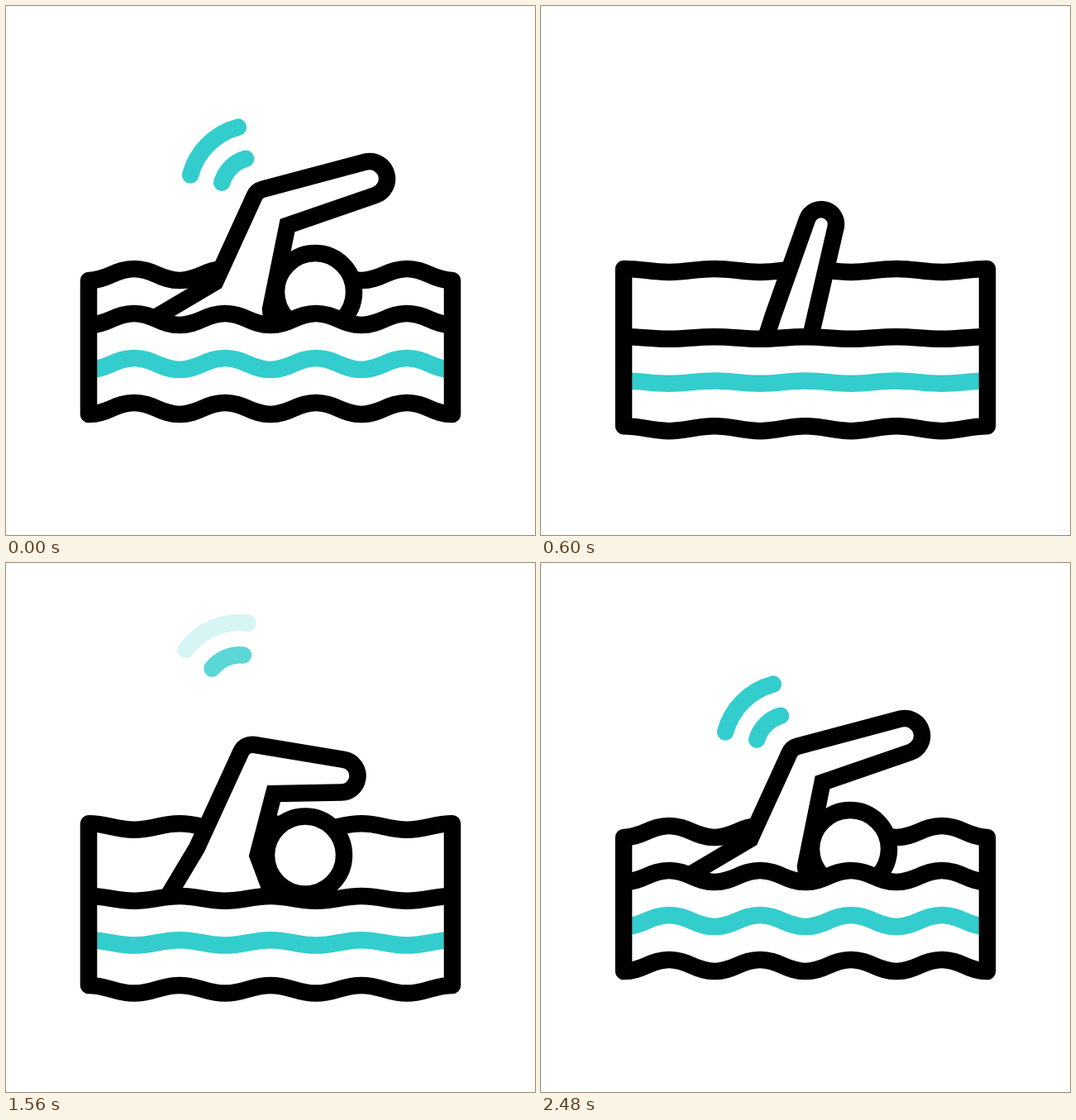
These frames come from a looping animation (640x640 px, 2.64 s). An HTML page with a canvas:

```html
<!DOCTYPE html>
<html lang="en">
<head>
<meta charset="utf-8">
<title>Swimmer</title>
<style>
  html, body { margin: 0; width: 100%; height: 100%; overflow: hidden; background: #fff; }
  canvas { display: block; width: 640px; height: 640px; }
</style>
</head>
<body>
<canvas id="stage" width="640" height="640"></canvas>
<script>
const ctx = document.getElementById('stage').getContext('2d');
const LOOP = 2640, STEP = 40, LAST = 2480, HALF = 1120;
const TEAL = '#33cdcd', INK = '#000', PAPER = '#fff';
const LEFT = 100, RIGHT = 540, CREST = 55, HANDLE = 23, LINE = 20.5;

// Each pose: foot, hip, elbow, hand (x, y, radius), armpit, waist, belly, head
const REST = [150,395, 253,334, 303.5,223.6, 440,209,21, 340.5,265.5, 320,367, 324,400, 374,346];
const UP = [136,398, 252.5,309, 285,208, 366,118.5,18, 331,228, 321.5,333, 336,403, 376,311];
const DIVE = [150,394, 250,304, 281,208, 339,98,18, 327,230, 318,334, 325,384, 372,312];
const REACH = [190,413, 231,344.5, 289,218, 405.5,257.5,20, 324,279, 304.5,354, 327,414, 362,353.5];
const PULL = [160,409, 240,313, 297,195.5, 421,218,20, 330,249, 310.5,333, 328,406, 364,325.5];

// The hand radius at index 8 shifts the x, y order of the values after it
const isY = i => i < 8 ? i % 2 === 1 : i > 8 && i % 2 === 0;
const blend = (a, b, w, dy) => a.map((v, i) => v + (b[i] - v) * w + (isY(i) ? dy : 0));

const KEYS = [
  [0, REST],
  [240, UP],
  [360, blend(UP, DIVE, 0.35, -10)],
  [560, blend(UP, DIVE, 0.9, 101)],
  [600, blend(UP, DIVE, 1, 166)],
  [800, blend(UP, DIVE, 1, 500)],
  [1300, blend(REACH, REACH, 0, 240)],
  [1560, REACH],
  [2040, PULL],
  [LAST, REST]
];

const clamp = x => Math.min(1, Math.max(0, x));
const smooth = x => { x = clamp(x); return x * x * (3 - 2 * x); };
const ramp = (t, from, to) => clamp((t - from) / (to - from));

function slope(k, i) {
  return (KEYS[k + 1][1][i] - KEYS[k][1][i]) / (KEYS[k + 1][0] - KEYS[k][0]);
}

// Monotone tangent: flat at turning points and at both ends
function tangent(k, i) {
  if (k === 0 || k === KEYS.length - 1) return 0;
  const a = slope(k - 1, i), b = slope(k, i);
  return a * b <= 0 ? 0 : 2 * a * b / (a + b);
}

function poseAt(t) {
  let k = 0;
  while (k < KEYS.length - 2 && t >= KEYS[k + 1][0]) k++;
  const [t0, a] = KEYS[k], [t1, b] = KEYS[k + 1];
  const span = t1 - t0, u = (t - t0) / span, s = smooth(u);
  return a.map((v, i) => v + (b[i] - v) * s
    + span * u * (1 - u) * ((1 - u) * tangent(k, i) - u * tangent(k + 1, i)));
}

// Adds a wave across the pool to the current path
function wave(mid, swing, reverse) {
  const dir = reverse ? -1 : 1;
  let x = reverse ? RIGHT : LEFT, side = 1;
  ctx.lineTo(x, mid + swing);
  for (let n = 0; n < 8; n++) {
    const y0 = mid + swing * side, y1 = mid - swing * side, next = x + dir * CREST;
    ctx.bezierCurveTo(x + dir * HANDLE, y0, next - dir * HANDLE, y1, next, y1);
    x = next;
    side = -side;
  }
}

function strokeWave(color, mid, swing) {
  ctx.beginPath();
  wave(mid, swing);
  ctx.strokeStyle = color;
  ctx.stroke();
}

function paintShape() {
  ctx.fillStyle = PAPER;
  ctx.strokeStyle = INK;
  ctx.fill();
  ctx.stroke();
}

// Angle on the hand circle where the line from (x, y) touches it
function touchAngle(x, y, hx, hy, r, side) {
  return Math.atan2(y - hy, x - hx) + side * Math.acos(r / Math.hypot(x - hx, y - hy));
}

function drawSwimmer(pose) {
  const [fx, fy, cx, cy, ex, ey, hx, hy, r, ax, ay, wx, wy, bx, by, headX, headY] = pose;
  const start = touchAngle(ex, ey, hx, hy, r, 1);
  const end = touchAngle(ax, ay, hx, hy, r, -1);
  ctx.lineJoin = 'miter';
  ctx.beginPath();
  ctx.moveTo(fx, fy);
  ctx.lineTo(cx, cy);
  ctx.arcTo(ex, ey, hx + r * Math.cos(start), hy + r * Math.sin(start), 15);
  ctx.arc(hx, hy, r, start, end);
  ctx.lineTo(ax, ay);
  ctx.lineTo(wx, wy);
  ctx.lineTo(bx, by);
  paintShape();
  ctx.beginPath();
  ctx.arc(headX, headY, 47, 0, Math.PI * 2);
  paintShape();
}

function drawArc(radius, spread, alpha) {
  if (alpha <= 0) return;
  const rad = Math.PI / 180;
  ctx.globalAlpha = alpha;
  ctx.beginPath();
  ctx.arc(0, 0, radius, (225 - spread) * rad, (225 + spread) * rad);
  ctx.stroke();
}

function drawSplash(t, k) {
  const [dx, dy, turn] = t < HALF ? [-68, -76, 89] : [-29, -109, 33];
  const inner = t < HALF ? 1 - ramp(t, 236, 360) : ramp(t, 1480, 1580);
  const outer = t < HALF ? 1 - ramp(t, 80, 246)
    : ramp(t, 1535, 1660) - ramp(t, 1800, 1920) + ramp(t, 2240, 2400);
  ctx.save();
  ctx.translate(302 + dx * k, 225.5 + dy * k);
  ctx.rotate(turn * k * Math.PI / 180);
  ctx.strokeStyle = TEAL;
  ctx.lineCap = 'round';
  drawArc(42.5, 28.7, inner);
  drawArc(81.7, 30, outer);
  ctx.restore();
}

function draw(t) {
  const k = t < HALF ? smooth(t / HALF) : 1 - smooth((t - HALF) / HALF);
  const surface = [379 + 40.7 * k, 7 - 15 * k];

  ctx.fillStyle = PAPER;
  ctx.fillRect(0, 0, 640, 640);
  ctx.lineWidth = LINE;
  strokeWave(TEAL, 433 + 40 * k, 7 - 15.5 * k);

  ctx.lineJoin = 'round';
  ctx.beginPath();
  wave(325 - 9.2 * k, 7 - 16.3 * k);
  wave(487 + 43.7 * k, 7 - 18 * k, true);
  ctx.closePath();
  ctx.strokeStyle = INK;
  ctx.stroke();

  ctx.save();
  ctx.beginPath();
  ctx.moveTo(LEFT, 0);
  wave(...surface);
  ctx.lineTo(RIGHT, 0);
  ctx.clip();
  drawSwimmer(poseAt(t));
  ctx.restore();

  strokeWave(INK, ...surface);
  drawSplash(t, k);
}

function tick() {
  const t = performance.now() % LOOP;
  draw(Math.min(LAST, Math.floor(t / STEP) * STEP));
  requestAnimationFrame(tick);
}
tick();
</script>
</body>
</html>
```
